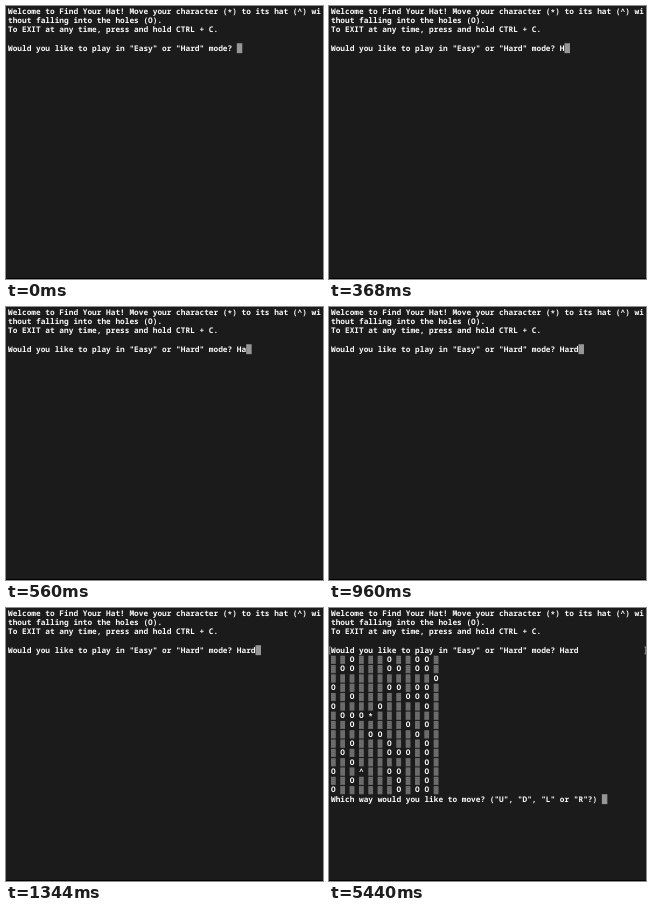
An HTML page with a canvas that plays this animation: 317x273 px, repeating every 8000 ms.

```html
<!DOCTYPE html>
<html lang="en">
<head>
<meta charset="utf-8">
<title>Terminal game</title>
<style>
  html, body { margin: 0; width: 100%; height: 100%; overflow: hidden; background: #1b1b1b; }
  canvas { display: block; }
</style>
</head>
<body>
<canvas id="stage" width="317" height="273"></canvas>
<script>
const ctx = document.getElementById('stage').getContext('2d');
const LOOP = 8000, SUBMIT = 1600;
const LEFT = 2, TOP = 0.4, CELL_W = 4.67, LINE_H = 9.31, BASE = 7.2;
const INK = '#fafafa';

const intro = [
  'Welcome to Find Your Hat! Move your character (*) to its hat (^) wi',
  'thout falling into the holes (O).',
  'To EXIT at any time, press and hold CTRL + C.'
];
const question = 'Would you like to play in "Easy" or "Hard" mode? ';
const answer = 'Hard';
const keyTimes = [80, 560, 800, 960];
const movePrompt = 'Which way would you like to move? ("U", "D", "L" or "R"?) ';

// Dots are ground, O is a hole, * the player, ^ the hat.
const field = [
  '..O...O..OO.',
  '.OO...OO.OO.',
  '...........O',
  'O.....OO.OO.',
  '..O.....OOO.',
  'O....O....O.',
  '.OOO*.......',
  '..O.....O.O.',
  '....OO...O..',
  '..O...O...O.',
  '.O....OOO.O.',
  '..O.......O.',
  'O..^..OO..O.',
  '..O....O..O.',
  'O......O.OO.'
];

const cellX = col => LEFT + col * CELL_W;
const cellY = row => TOP + row * LINE_H;

function glyph(ch, col, row) {
  const drop = ch === '*' ? 1.2 : 0;
  ctx.fillStyle = INK;
  ctx.fillText(ch, cellX(col), cellY(row) + BASE + drop);
}

function print(text, row) {
  [...text].forEach((ch, col) => { if (ch !== ' ') glyph(ch, col, row); });
}

function cursor(col, row) {
  ctx.fillStyle = '#969696';
  ctx.fillRect(cellX(col), cellY(row) - 0.4, CELL_W + 0.8, LINE_H + 0.6);
}

function ground(col, row) {
  const x = cellX(col), y = cellY(row);
  ctx.fillStyle = '#727272';
  ctx.fillRect(x, y + 0.8, CELL_W, LINE_H - 1.2);
  ctx.fillStyle = '#626262';
  for (let dy = 2; dy < LINE_H - 1; dy += 2) ctx.fillRect(x, y + dy, CELL_W, 0.8);
}

function drawField(firstRow) {
  field.forEach((line, r) => [...line].forEach((ch, c) => {
    if (ch === '.') ground(c * 2, firstRow + r);
    else glyph(ch, c * 2, firstRow + r);
  }));
}

// Small bracket marks at both ends of a submitted line.
function lineMarks(row) {
  const y = cellY(row) + 1;
  ctx.fillStyle = '#8c8c8c';
  for (const [stem, tick] of [[0.3, 0.3], [316, 315.2]]) {
    ctx.fillRect(stem, y, 0.8, 7.6);
    ctx.fillRect(tick, y, 1.6, 0.8);
    ctx.fillRect(tick, y + 6.8, 1.6, 0.8);
  }
}

function background() {
  ctx.fillStyle = '#1b1b1b';
  ctx.fillRect(0, 0, 317, 273);
  ctx.fillStyle = '#000';
  ctx.fillRect(0, 272, 317, 1);
}

function draw(t) {
  background();
  ctx.font = '600 7.78px "Noto Sans Mono", "DejaVu Sans Mono", monospace';
  ctx.textBaseline = 'alphabetic';
  ctx.textRendering = 'geometricPrecision';

  intro.forEach(print);
  const typed = question + answer.slice(0, keyTimes.filter(k => t >= k).length);
  print(typed, 4);
  if (t < SUBMIT) {
    cursor(typed.length, 4);
  } else {
    lineMarks(4);
    drawField(5);
    print(movePrompt, 20);
    cursor(movePrompt.length, 20);
  }
}

const start = performance.now();
function tick() {
  draw((performance.now() - start) % LOOP);
  requestAnimationFrame(tick);
}
tick();
</script>
</body>
</html>
```
